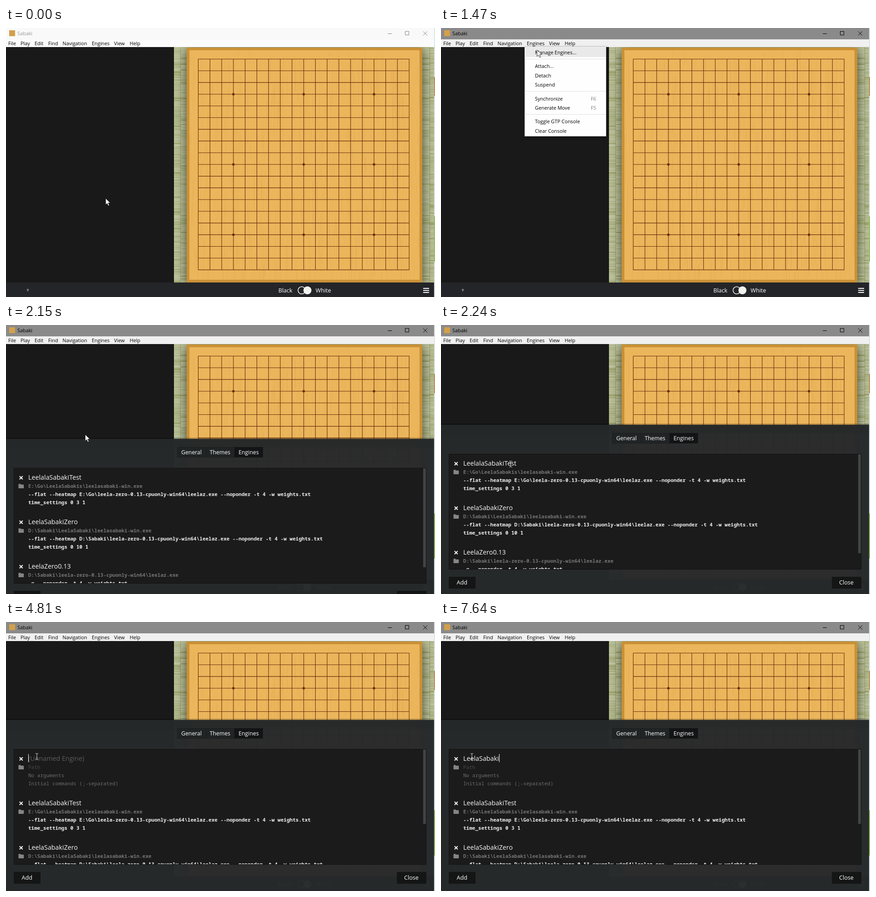
These frames come from a looping animation (945 px wide and 593 px high, 8 s). An HTML page with a canvas:

```html
<!DOCTYPE html>
<html lang="en">
<head>
<meta charset="utf-8">
<title>Engine setup</title>
<style>
  html, body { margin: 0; width: 100%; height: 100%; overflow: hidden; background: #191919; }
  canvas, svg { position: absolute; left: 0; top: 0; width: 945px; height: 593px; }
  text { font-family: "Open Sans", "Noto Sans", sans-serif; white-space: pre; }
  .ui { font-size: 10.85px; fill: #000; }
  .label { font-size: 12.6px; font-weight: 500; fill: #fff; }
  .tab { font-size: 12.3px; }
  .mid { text-anchor: middle; }
  .name { font-size: 14.3px; fill: #f8f8f8; }
  .mono { font: 600 11.04px "Noto Sans Mono", "DejaVu Sans Mono", monospace; fill: #eee; }
  .path { fill: #757575; }
  .hint { font-weight: 400; fill: #6c6c6c; }
  .faint { fill: #484848; }
</style>
</head>
<body>
<canvas id="board" width="945" height="593"></canvas>
<svg viewBox="0 0 945 593" xmlns="http://www.w3.org/2000/svg">
  <defs>
    <clipPath id="window"><rect y="42" width="943" height="551"/></clipPath>
    <clipPath id="listClip"><rect x="18" y="65" width="907" height="253"/></clipPath>
    <filter id="blur" x="-10%" y="-10%" width="120%" height="120%"><feGaussianBlur stdDeviation="3"/></filter>
    <g id="cross"><path d="M29.8 17.3l7 7m0-7l-7 7" stroke="#f4f4f4" stroke-width="2"/></g>
    <path id="folder" d="M27.5 36q0-1.2 1.2-1.2h3l1.3 1.4h5q1.2 0 1.2 1.2v6q0 1.2-1.2 1.2h-9.3q-1.2 0-1.2-1.2z" fill="#858585"/>
  </defs>

  <rect id="titleBar" width="943" height="25"/>
  <rect id="menuBar" y="25" width="943" height="17"/>
  <rect x="7" y="5" width="13" height="13" fill="#d3a04a"/>
  <text id="title" class="ui" x="25" y="16">Sabaki</text>
  <path id="controls" d="M841 12.5h9M879.5 7.5h8v8h-8zM919 7.5l9 9m0-9l-9 9" fill="none"/>
  <g id="menuNames"></g>

  <rect y="561" width="943" height="32" fill="#242528"/>
  <path d="M45.3 575.5h5.4l-2.7 6z" fill="#858585"/>
  <text class="label" x="600" y="582.5">Black</text>
  <text class="label" x="682" y="582.5">White</text>
  <circle cx="651.3" cy="578.3" r="8" fill="#242528" stroke="#f2f2ee" stroke-width="1.6"/>
  <circle cx="664" cy="578.3" r="8.8" fill="#f2f2ee"/>
  <path d="M919 574h13m-13 4.5h13m-13 4.5h13" stroke="#fff" stroke-width="2.2"/>

  <g id="menu">
    <rect x="186" y="43" width="180" height="199" fill="#000" opacity=".35" filter="url(#blur)"/>
    <rect x="184.5" y="41.5" width="179" height="197" fill="#fefefe" stroke="#c4c4c4"/>
    <rect id="hover" x="186" y="43" width="177" height="21" fill="#e9e9e9"/>
    <path d="M186 68.5h177M186 139.5h177M186 190.5h177" stroke="#e0e0e0"/>
    <g id="menuItems"></g>
  </g>

  <g clip-path="url(#window)">
    <g id="drawer">
      <rect x="-5" y="-1" width="955" height="20" opacity=".5" filter="url(#blur)"/>
      <rect width="943" height="380" fill="#26292b" fill-opacity=".975"/>
      <rect x="377.5" y="18.5" width="188" height="22" fill="#212425" stroke="#1a1c1d"/>
      <path d="M440.5 18v23" stroke="#1a1c1d"/>
      <rect x="503" y="18" width="63" height="23" fill="#131415"/>
      <text class="label tab mid" x="408.5" y="33.5">General</text>
      <text class="label tab mid" x="471.5" y="33.5">Themes</text>
      <text class="label tab mid" x="534.5" y="33.5">Engines</text>
      <rect x="17.5" y="64.5" width="908" height="254" fill="#1b1b1b" stroke="#111"/>
      <g clip-path="url(#listClip)">
        <g id="fresh" transform="translate(0 65)">
          <use href="#cross"/><use href="#folder" y="-.5"/>
          <text id="typed" class="name" x="49" y="24.5"></text>
          <text class="mono hint faint" x="49" y="43">Path</text>
          <text class="mono hint" x="49" y="61">No arguments</text>
          <text class="mono hint" x="49" y="79">Initial commands (;-separated)</text>
        </g>
        <g id="engines"></g>
        <rect id="caret" y="75" width="1" height="18" fill="#fff"/>
      </g>
      <rect id="thumb" x="919" y="65" width="6" fill="#434343"/>
      <rect x="17" y="335" width="59" height="26" fill="#141515"/>
      <rect x="861" y="335" width="65" height="26" fill="#141515"/>
      <text class="label mid" x="46.3" y="352">Add</text>
      <text class="label mid" x="893" y="352">Close</text>
    </g>
  </g>

  <path id="arrow" d="M0 0v14.2l3.3-3.1 2.4 5.4 2.4-1-2.4-5.3h4.6z" fill="#fff" stroke="#111" stroke-width=".8"/>
  <path id="beam" d="M-3 -6.5h2.2l.8.8.8-.8h2.2M0 -6v12M-3 6.5h2.2l.8-.8.8.8h2.2" fill="none" stroke="#ddd"/>
</svg>

<script>
const $ = id => document.getElementById(id);
const LOOP = 8000;

// ---------- static picture ----------
function randomizer(seed) {
  return () => (seed = (seed * 16807) % 2147483647) / 2147483647;
}

function drawMat(ctx, random) {
  for (const [x, width] of [[370, 15], [385, 548], [933, 10]]) {
    for (let y = 42; y < 561;) {
      const height = 1 + Math.floor(random() * 1.8);
      const light = 60 + random() * 11 - (random() < .12 ? 11 : 0);
      ctx.fillStyle = `hsl(${66 + random() * 6} 24% ${light}%)`;
      ctx.fillRect(x, y, width, height);
      y += height;
    }
  }
  ctx.fillStyle = "rgba(60,65,30,.25)";
  ctx.fillRect(384, 42, 1, 519);
  ctx.fillRect(933, 42, 1, 519);
}

function drawWood(ctx, random) {
  ctx.save();
  ctx.shadowColor = "rgba(0,0,0,.65)";
  ctx.shadowBlur = 22;
  ctx.shadowOffsetY = 4;
  ctx.fillStyle = "#ca9136";
  ctx.fillRect(398, 43, 519, 518);
  ctx.restore();
  ctx.fillStyle = "#ebb55b";
  ctx.fillRect(404, 49, 507, 506);
  for (let i = 0; i < 1300; i++) {
    const y = 49 + random() * 490;
    ctx.fillStyle = random() < .55 ? "rgba(190,120,40,.08)" : "rgba(255,210,130,.09)";
    ctx.fillRect(404 + Math.floor(random() * 507), y, 1, Math.min(555 - y, 10 + random() * 65));
  }
}

function drawGrid(ctx) {
  const left = 423.5, top = 68.5, cell = 25.81, size = 18 * cell;
  ctx.strokeStyle = ctx.fillStyle = "#652f0c";
  ctx.lineWidth = 1.1;
  ctx.beginPath();
  for (let i = 0; i < 19; i++) {
    const x = left + i * cell, y = top + i * cell;
    ctx.moveTo(x, top - .5); ctx.lineTo(x, top + size + .5);
    ctx.moveTo(left - .5, y); ctx.lineTo(left + size + .5, y);
  }
  ctx.stroke();
  for (const col of [3, 9, 15]) for (const row of [3, 9, 15]) {
    ctx.beginPath();
    ctx.arc(left + col * cell, top + row * cell, 2.7, 0, 7);
    ctx.fill();
  }
}

function drawBoard() {
  const ctx = $("board").getContext("2d");
  const random = randomizer(4711);
  ctx.fillStyle = "#191919";
  ctx.fillRect(0, 42, 370, 519);
  ctx.save();
  ctx.beginPath();
  ctx.rect(370, 42, 573, 519);
  ctx.clip();
  drawMat(ctx, random);
  drawWood(ctx, random);
  drawGrid(ctx);
  ctx.restore();
  for (const [y, height, color] of [[0, 593, "#dbe5e6"], [108, 42, "#c08d5c"], [415, 100, "#8fc162"]]) {
    ctx.fillStyle = color;
    ctx.fillRect(943, y, 2, height);
  }
}

const label = (cls, x, y, text) => `<text class="${cls}" x="${x}" y="${y}">${text}</text>`;

function fillTexts() {
  const bar = { File: 5, Play: 32, Edit: 63, Find: 93, Navigation: 124.5, Engines: 189, View: 238, Help: 272.5 };
  $("menuNames").innerHTML = Object.entries(bar).map(([text, x]) => label("ui", x, 38, text)).join("");

  const items = { "Manage Engines...": 58, "Attach...": 88, Detach: 108.5, Suspend: 129, Synchronize: 159.5,
    "Generate Move": 180, "Toggle GTP Console": 210, "Clear Console": 231 };
  $("menuItems").innerHTML = Object.entries(items).map(([text, y]) => label("ui", 207, y, text)).join("") +
    `<g opacity=".5">${label("ui", 330, 159.5, "F6")}${label("ui", 330, 180, "F5")}</g>`;

  const leelaz = "leela-zero-0.13-cpuonly-win64\\leelaz.exe";
  const tail = "--noponder -t 4 -w weights.txt";
  const engines = [
    ["LeelalaSabakiTest", "E:\\Go\\LeelaSabakis\\leelasabaki-win.exe", `--flat --heatmap E:\\Go\\${leelaz} ${tail}`, "time_settings 0 3 1"],
    ["LeelaSabakiZero", "D:\\Sabaki\\LeelaSabaki\\leelasabaki-win.exe", `--flat --heatmap D:\\Sabaki\\${leelaz} ${tail}`, "time_settings 0 10 1"],
    ["LeelaZero0.13", `D:\\Sabaki\\${leelaz}`, `-g ${tail}`, ""]
  ];
  $("engines").innerHTML = engines.map(([name, path, args, commands], i) =>
    `<g transform="translate(0 ${65 + 98 * i})"><use href="#cross"/><use href="#folder" y="-.5"/>` +
    label("name", 49, 24.5, name) + label("mono path", 49, 43, path) +
    label("mono", 49, 61, args) + label("mono", 49, 79, commands) + "</g>").join("");
}

// ---------- motion ----------
const ACTIVATE = 1110, MENU_OPEN = 1170, MENU_CLOSE = 1830, ADDED = 3390;
const slideTicks = [1830, 1890, 1950, 2000, 2080, 2130, 2190, 2240, 2290];
const keyTimes = [4870, 5240, 5420, 5590, 5760, 6440, 6870, 7050, 7240, 7460, 7640];
const caretSpans = [[2850, ADDED], [3850, 4340], [4810, 6260], [6440, LOOP]];
const pointerStops = [
  [250, 219, 375], [1050, 206, 36], [1350, 206, 36], [1470, 211, 48], [1830, 211, 48],
  [2000, 198, 164], [2240, 153, 306], [2730, 153, 306], [3330, 48, 538], [3390, 45, 558],
  [3450, 55, 420], [3850, 67.5, 296]
];

const within = (t, from, to) => t >= from && t < to;
const show = (id, visible) => $(id).style.display = visible ? "" : "none";

function pointerAt(t) {
  const next = pointerStops.findIndex(stop => stop[0] > t);
  if (next < 0) return pointerStops.at(-1).slice(1);
  if (next === 0) return pointerStops[0].slice(1);
  const [t0, x0, y0] = pointerStops[next - 1], [t1, x1, y1] = pointerStops[next];
  let p = (t - t0) / (t1 - t0);
  if (t1 - t0 > 350) p = p * p * (3 - 2 * p);
  return [Math.round(x0 + (x1 - x0) * p), Math.round(y0 + (y1 - y0) * p)];
}

function drawerTop(t) {
  const left = 1 - Math.min(1, Math.max(0, (t - 1850) / 479));
  return Math.round(216 + 377 * left ** 2.7);
}

function render(now) {
  const t = now % LOOP;
  const frame = within(t, 1830, 2290) ? slideTicks.findLast(tick => tick <= t) : t;

  const active = t >= ACTIVATE;
  $("titleBar").setAttribute("fill", active ? "#8a8a8a" : "#f9f9f9");
  $("menuBar").setAttribute("fill", active ? "#f0f0f0" : "#fbfbfb");
  $("title").style.fill = active ? "#000" : "#999";
  $("controls").setAttribute("stroke", active ? "#000" : "#858585");
  show("menu", within(t, MENU_OPEN, MENU_CLOSE));
  show("hover", t >= 1410);

  show("drawer", t >= MENU_CLOSE);
  $("drawer").setAttribute("transform", `translate(0 ${drawerTop(frame)})`);
  const added = t >= ADDED;
  show("fresh", added);
  $("engines").setAttribute("transform", `translate(0 ${added ? 98 : 0})`);
  $("thumb").setAttribute("height", added ? 164 : 218);

  const typed = "LeelaSabaki".slice(0, keyTimes.filter(key => key <= t).length);
  const field = $("typed");
  field.textContent = typed || "(Unnamed Engine)";
  field.style.fill = typed ? "" : "#5c5c5c";
  const caretOn = caretSpans.some(([from, to]) => within(t, from, to));
  show("caret", caretOn);
  if (caretOn) {
    const text = added ? field : $("engines").querySelector(".name");
    const width = added && !typed ? 0 : text.getComputedTextLength();
    $("caret").setAttribute("x", Math.round(49 + width));
  }

  const [x, y] = pointerAt(frame);
  const overField = t > 2190 && (within(y, 290, 366) || within(y, 388, 464));
  show("arrow", !overField);
  show("beam", overField);
  $(overField ? "beam" : "arrow").setAttribute("transform", `translate(${x + .5} ${y + .5})`);
}

drawBoard();
fillTexts();
const start = performance.now();
(function tick() {
  render(performance.now() - start);
  requestAnimationFrame(tick);
})();
</script>
</body>
</html>
```
